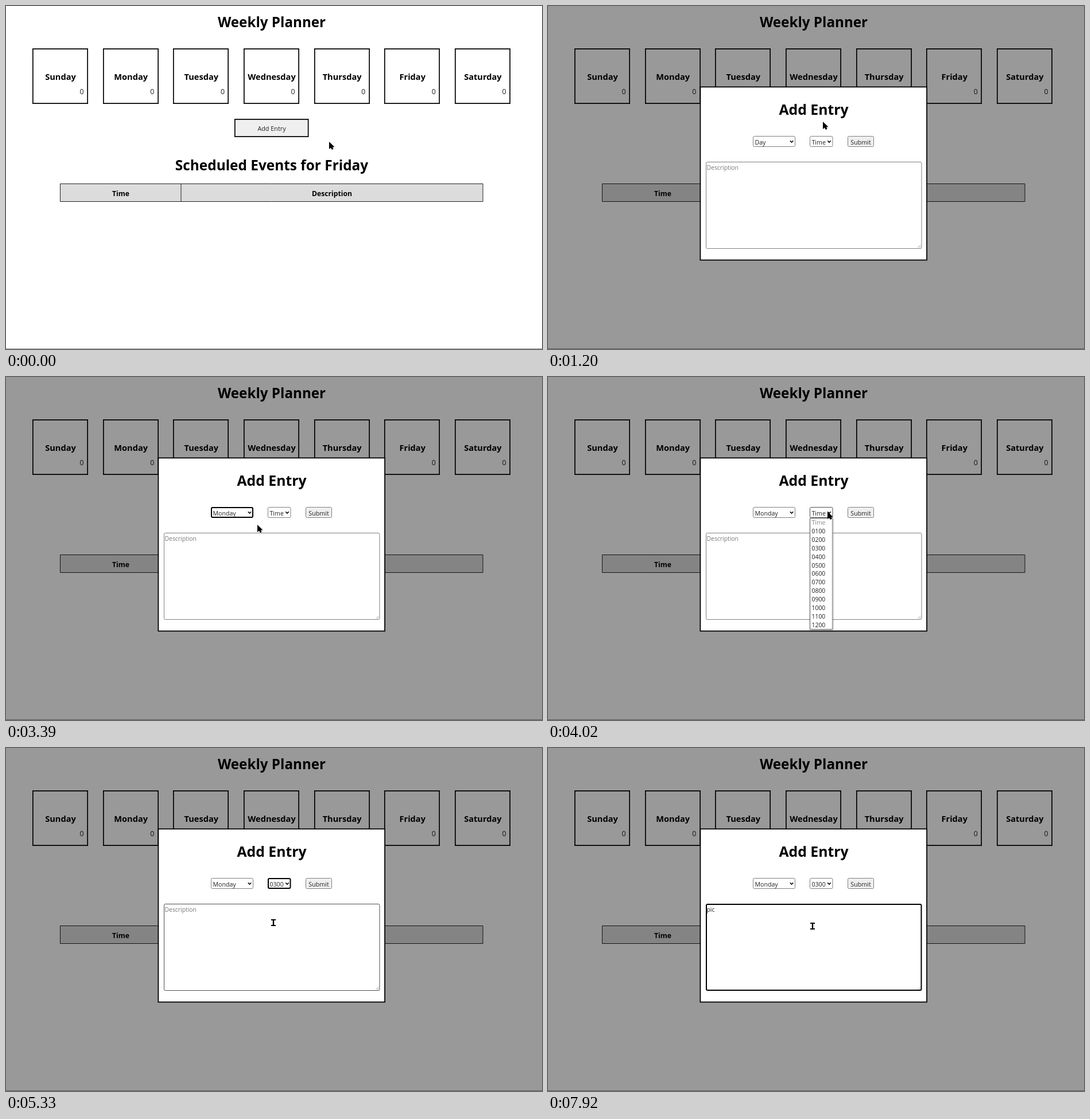
Recreate the animation shown at these times as an HTML page with a canvas. Size 934 by 599 pixels, loop 8000 ms.

```html
<!DOCTYPE html>
<html lang="en">
<head>
<meta charset="utf-8">
<title>Weekly Planner</title>
<style>
  html, body { margin: 0; width: 100%; height: 100%; overflow: hidden; background: #fff; }
  canvas { display: block; }
</style>
</head>
<body>
<canvas id="stage" width="934" height="599"></canvas>
<script>
const ctx = document.getElementById('stage').getContext('2d');
const LOOP = 8000, ROW = 14.86, LIST_TOP = 247;
const DAYS = ['Sunday', 'Monday', 'Tuesday', 'Wednesday', 'Thursday', 'Friday', 'Saturday'];
const HOURS = Array.from({ length: 12 }, (_, i) => String(i + 1).padStart(2, '0') + '00');

// Boxes: x, y, width, height
const addButton = [398, 197, 129.5, 32];
const daySelect = [357, 227, 74, 19];
const timeSelect = [456, 227, 40.5, 19];
const notes = [275, 272, 376.5, 152];

// Pointer moves: start, end, x, y
const moves = [
  [70, 540, 479, 202],
  [1600, 1740, 468, 229], [1810, 1880, 424, 231],
  [2150, 2560, 412, 281],
  [3320, 3390, 438, 258], [3460, 3750, 487, 235],
  [4090, 4510, 460, 307], [4580, 4850, 463, 300],
  [5050, 5330, 466, 305], [5400, 5460, 461, 311]
];
const clicks = [[1070, 1200], [2080, 2150], [3250, 3320], [3820, 3890], [4920, 4990], [5460, 5730]];
const typing = [[6660, 'p'], [6860, 'pi'], [7190, 'pic'], [7390, 'pic ']];

const within = (t, a, b) => t >= a && t < b;
const inside = (p, [x, y, w, h]) => within(p.x, x, x + w) && within(p.y, y, y + h);

function pointerAt(t) {
  let x = 563, y = 237;
  for (const [start, end, toX, toY] of moves) {
    if (t < start) break;
    const k = Math.min(1, (Math.floor((t - start) / 70) + 1) * 70 / (end - start + 70));
    x += (toX - x) * k;
    y += (toY - y) * k;
  }
  return { x, y };
}

function text(str, x, y, size, { bold = false, align = 'left', color = '#000' } = {}) {
  ctx.font = `${bold ? 'bold ' : ''}${size}px "Open Sans", "Noto Sans", sans-serif`;
  ctx.textAlign = align;
  ctx.fillStyle = color;
  ctx.fillText(str, x, y);
}

const heading = (str, x, y, size) => text(str, x, y, size, { bold: true, align: 'center' });

// Border is drawn inside the box.
function box([x, y, w, h], fill, stroke, line = 1, radius = 0) {
  ctx.beginPath();
  ctx.roundRect(x + line / 2, y + line / 2, w - line, h - line, radius);
  if (fill) {
    ctx.fillStyle = fill;
    ctx.fill();
  }
  ctx.strokeStyle = stroke;
  ctx.lineWidth = line;
  ctx.stroke();
}

function field(rect, fill, focused, hovered) {
  if (focused) box(rect, fill, '#000', 2, 2);
  else box(rect, fill, hovered ? '#4f4f4f' : '#808080', 1, 2);
}

function polyline(points, color, width) {
  ctx.beginPath();
  points.forEach(([x, y]) => ctx.lineTo(x, y));
  ctx.strokeStyle = color;
  ctx.lineWidth = width;
  ctx.stroke();
}

function drawPage(hovered) {
  ctx.fillStyle = '#fff';
  ctx.fillRect(0, 0, 934, 599);
  heading('Weekly Planner', 463, 37, 24.2);
  DAYS.forEach((day, i) => {
    const x = i * 122.65;
    box([Math.round(46 + x), 74, 97, 97], null, '#000', 1.7);
    heading(day, 95 + x, 129.3, 14.6);
    text('0', 135.7 + x, 154, 12.4, { align: 'right', color: '#222' });
  });
  box(addButton, hovered ? '#808080' : '#efefef', '#000', 1.7);
  text('Add Entry', 463, 217.5, 10.8, { align: 'center', color: hovered ? '#fff' : '#222' });
  heading('Scheduled Events for Friday', 463, 286.5, 24.4);
  box([94, 310, 737.5, 32], '#dcdcdc', '#222');
  polyline([[305, 310], [305, 342]], '#222', 1);
  heading('Time', 200, 332, 12.2);
  heading('Description', 568, 332, 12.2);
  ctx.fillStyle = '#999';
  ctx.fillRect(0, 598, 934, 1);
}

function drawSelect(rect, label, focused, hovered) {
  const [x, y, w] = rect;
  field(rect, '#fff', focused, hovered);
  text(label, x + 3.5, y + 14.5, 10.6, { color: '#222' });
  const cx = x + w - 6.5;
  polyline([[cx - 2.7, y + 8.3], [cx, y + 11], [cx + 2.7, y + 8.3]], '#000', 1.6);
}

function drawList([x, , w], items, pointer) {
  ctx.save();
  ctx.shadowColor = 'rgba(0,0,0,.35)';
  ctx.shadowBlur = 3;
  ctx.shadowOffsetY = 1;
  box([x, LIST_TOP - 1, w, items.length * ROW + 2], '#fff', '#777');
  ctx.restore();
  const active = Math.floor((pointer.y - LIST_TOP) / ROW);
  items.forEach((item, i) => {
    const y = LIST_TOP + i * ROW, on = i > 0 && i === active;
    if (on) {
      ctx.fillStyle = '#1e90ff';
      ctx.fillRect(x + 1, y - 0.4, w - 2, ROW);
    }
    text(item, x + 3.5, y + 11.2, 10.4, { color: on ? '#fff' : i ? '#222' : '#888' });
  });
}

function drawNotes(t, hovered) {
  const typed = typing.filter(([at]) => t >= at).pop();
  const value = typed ? typed[1] : '';
  field(notes, '#fff', t >= 5530, hovered);
  text(value || 'Description', 276.5, 286, 10.4, { color: value ? '#222' : '#777' });
  const caretOn = within(t, 5530, 6060) || within(t, 6590, 7920);
  if (caretOn) {
    const x = Math.round(277 + (value && ctx.measureText(value).width));
    ctx.fillStyle = '#000';
    ctx.fillRect(x, 275, 1, 14);
  }
  polyline([[644.5, 422], [649.5, 417]], '#888', 0.8);
  polyline([[647.5, 422], [649.5, 420]], '#888', 0.8);
}

function drawDialog(t, pointer, dayOpen, timeOpen) {
  ctx.fillStyle = 'rgba(0,0,0,.4)';
  ctx.fillRect(0, 0, 934, 599);
  box([264.5, 140.5, 396.5, 304], '#fff', '#000', 1.8);
  heading('Add Entry', 463, 190, 24.8);
  drawSelect(daySelect, t < 3320 ? 'Day' : 'Monday', within(t, 3320, 3820), inside(pointer, daySelect));
  drawSelect(timeSelect, t < 4990 ? 'Time' : '0300', within(t, 4990, 5530), inside(pointer, timeSelect));
  field([522, 227, 46, 19], '#efefef');
  text('Submit', 545, 241.5, 10.7, { align: 'center', color: '#222' });
  drawNotes(t, !dayOpen && inside(pointer, notes));
  if (dayOpen) drawList(daySelect, ['Day', ...DAYS], pointer);
  if (timeOpen) drawList(timeSelect, ['Time', ...HOURS], pointer);
}

function drawPointer({ x, y }, clicking, beam) {
  if (clicking) {
    ctx.fillStyle = 'rgba(225,220,0,.65)';
    ctx.beginPath();
    ctx.arc(x + 0.8, y + 1, 7.8, 0, 7);
    ctx.fill();
  }
  ctx.fillStyle = '#000';
  if (beam) {
    ctx.fillRect(x - 4, y - 6, 8, 2);
    ctx.fillRect(x - 1.2, y - 6, 2.4, 12);
    ctx.fillRect(x - 4, y + 4, 8, 2);
    return;
  }
  ctx.beginPath();
  [[0, 0], [0, 13], [3, 10.5], [5, 14], [7.6, 12.8], [6, 9.5], [9.5, 9.2]]
    .forEach(([dx, dy]) => ctx.lineTo(x + dx, y + dy));
  ctx.fill();
}

function frame(now) {
  const t = now % LOOP, pointer = pointerAt(t);
  const dayOpen = within(t, 2150, 3320), timeOpen = within(t, 3890, 4990);
  const dialogOpen = t >= 1200;
  drawPage(inside(pointer, addButton));
  if (dialogOpen) drawDialog(t, pointer, dayOpen, timeOpen);
  const beam = dialogOpen && !dayOpen && !timeOpen && inside(pointer, notes);
  drawPointer(pointer, clicks.some(([a, b]) => within(t, a, b)), beam);
  requestAnimationFrame(frame);
}
requestAnimationFrame(frame);
</script>
</body>
</html>
```
